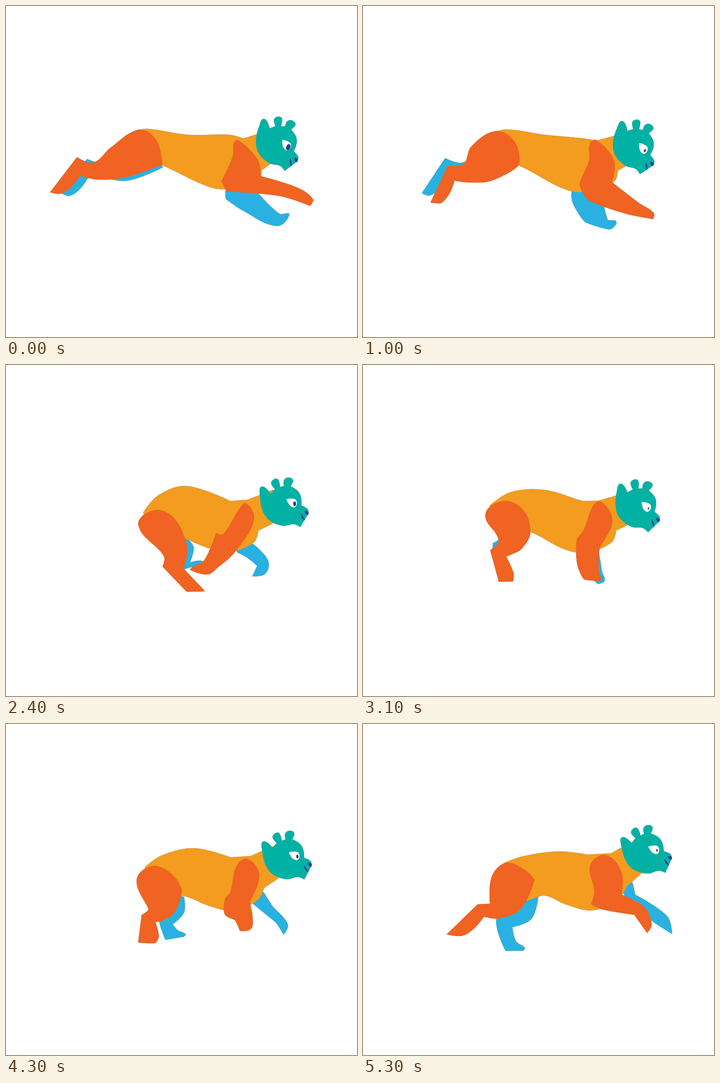
An HTML page with a canvas for the animation above (5.41 s loop, 771 px wide and 727 px high).

```html
<!DOCTYPE html>
<html lang="en">
<head>
<meta charset="utf-8">
<title>Running bear</title>
<style>
  html, body { margin: 0; overflow: hidden; background: #fff; }
  canvas { display: block; }
</style>
</head>
<body>
<canvas id="stage" width="771" height="727"></canvas>
<script>
const ctx = document.getElementById('stage').getContext('2d');
const LOOP = 5410, STEP = 100, CYCLE = 9;
const BLUE = '#29b1e1', RED = '#f06322', YELLOW = '#f39c1f', TEAL = '#00b1a4', NAVY = '#2b3c98';
const KEY_STEPS = [0, 2, 6, 8]; // stretched, landing, gathered, pushing off

// "x,y" is a smooth point, "x,y!" a corner; the third value is the smoothness.
const parse = text => text.split(' ').map(p => [...p.split(',').map(parseFloat), p.endsWith('!') ? 0 : 1]);
const limb = (color, ...poses) => ({ color, poses: poses.map(parse) });

// Back to front, one outline per key step.
const parts = [
  // far hind leg
  limb(BLUE,
    '300,320 345,354! 262,384 186,366! 166,398 140,417 122,411! 178,336! 215,345',
    '262,298 300,350 250,376 194,363! 176,396 154,415 137,411! 183,332! 222,343',
    '370,380 397,381! 412,400 404,434! 420,430 434,432 430,436! 388,450! 378,420',
    '330,380 385,379! 370,428 328,446! 336,477 355,491 352,498! 313,498! 293,428'),
  // far foreleg
  limb(BLUE,
    '510,390 553,410! 600,456 622,458 594,483 520,449 483,424! 485,400',
    '465,395 490,420 476,484! 491,490 491,498! 454,498! 438,440 438,400',
    '510,395 540,391! 575,428 570,458 541,464! 552,441! 528,422 507,411!',
    '580,352 592,348! 598,375! 668,422 679,461! 634,432 590,395 572,370'),
  // body
  limb(YELLOW,
    '285,273! 313,270 400,283 490,283 522,291! 575,274! 583,345! 561,361! 555,382 482,402 440,395 346,351 300,335',
    '255,294! 313,273 400,283 470,298 505,300! 575,285! 582,352! 558,363! 548,389 490,414 440,407 355,357 275,325',
    '302,323! 335,286 397,266 493,299! 531,296! 587,274! 590,346! 554,364! 544,390 492,410 445,402 395,382 310,350',
    '308,306! 350,291 430,280 494,287! 545,284! 585,262! 612,328! 580,356! 560,385 505,409 445,396 400,377 345,385'),
  // near hind leg
  limb(RED,
    '292,272 330,294 344,348! 265,376 200,381 163,373! 145,396 121,412 97,409! 156,332! 192,344 230,311',
    '292,278 337,303 340,350 300,391 265,394 239,394! 235,428 222,454! 200,454! 215,370! 249,350 247,305',
    '325,319 367,334 395,385 398,415 394,435 390,447! 426,485 437,497! 397,498! 344,443! 347,420 291,352',
    '315,305 357,321 377,342! 348,405 300,427 266,423! 245,448 218,465 184,462! 252,396! 279,395! 283,335'),
  // near foreleg
  limb(RED,
    '510,294 553,338 560,374! 640,399 674,424 668,439! 600,417 485,408! 473,385! 498,330 500,301',
    '518,296 551,345 534,400! 572,466 603,485 606,497! 560,497! 505,446 478,398 494,350 496,305',
    '528,304 545,340 505,408 465,445 442,460 404,450! 410,443 436,428 461,369! 477,371 513,315',
    '533,288 568,325 568,375! 618,402 634,440 624,459! 596,419! 525,407 501,396! 508,367 499,310')
];

// The head is rigid: x, y, angle in degrees and how open the iris is.
const headPoses = [[594, 310, 0, 1], [592.5, 322.5, 6.3, 0], [610, 314.5, -22, .7], [623, 290, -29, .4]].map(p => [p]);
const skull = outline(parse('-45,-13 -38,-45 -27,-62 -15,-41! -2,-46! -5,-61 4,-67 12,-63 10,-46! 19,-45! 23,-56 ' +
  '33,-59 42,-50 32,-39! 43,-23 44,-7 38,9! 48,22 45,32! 18,52! 8,41 -16,35 -39,13'));
const eye = outline(parse('13,-16! 22,-14 32,-6 25,7 15,0'));
const nose = outline(parse('40,23! 47,27 44,33 40,28'));
const mouth = outline(parse('31,24! 29,33 33,43! 33,33'));

function poseAt(poses, step) {
  const next = KEY_STEPS.findIndex(k => k >= step), prev = Math.max(0, next - 1);
  const mix = (step - KEY_STEPS[prev]) / (KEY_STEPS[next] - KEY_STEPS[prev] || 1);
  return poses[prev].map((p, i) => p.map((v, j) => v + (poses[next][i][j] - v) * mix));
}

// Closed curve: each tangent runs parallel to the line between the neighbours.
function outline(points) {
  const n = points.length, path = new Path2D();
  const tangents = points.map(([, , smooth], i) => {
    const a = points[(i + n - 1) % n], b = points[(i + 1) % n];
    const dx = b[0] - a[0], dy = b[1] - a[1], scale = .35 * smooth / (Math.hypot(dx, dy) || 1);
    return [dx * scale, dy * scale];
  });
  path.moveTo(points[0][0], points[0][1]);
  points.forEach(([x, y], i) => {
    const j = (i + 1) % n, [u, v] = points[j], len = Math.hypot(u - x, v - y);
    const [sx, sy] = tangents[i], [ex, ey] = tangents[j];
    path.bezierCurveTo(x + sx * len, y + sy * len, u - ex * len, v - ey * len, u, v);
  });
  return path;
}

function draw(step) {
  const [[x, y, angle, open]] = poseAt(headPoses, step);
  const place = new DOMMatrix().translate(x, y).rotate(angle);
  const iris = new Path2D();
  iris.ellipse(26, 0, 4.5 * open, 7 * open, .35, 0, Math.PI * 2);
  const onHead = (shape, color) => {
    const path = new Path2D();
    path.addPath(shape, place);
    return { path, color };
  };
  const figure = parts.map(({ poses, color }) => ({ path: outline(poseAt(poses, step)), color }));
  figure.push(onHead(skull, TEAL));
  const face = [onHead(eye, '#fff'), onHead(iris, NAVY), onHead(nose, NAVY), onHead(mouth, NAVY)];

  ctx.clearRect(0, 0, 771, 727);
  // Stroked beneath all fills, so only the silhouette keeps a thin edge.
  ctx.strokeStyle = 'rgba(70, 65, 50, .5)';
  for (const { path } of figure) ctx.stroke(path);
  for (const { path, color } of [...figure, ...face]) {
    ctx.fillStyle = color;
    ctx.fill(path);
  }
}

function tick() {
  const index = Math.min(53, Math.floor(performance.now() % LOOP / STEP));
  draw(index % CYCLE);
  requestAnimationFrame(tick);
}
tick();
</script>
</body>
</html>
```
